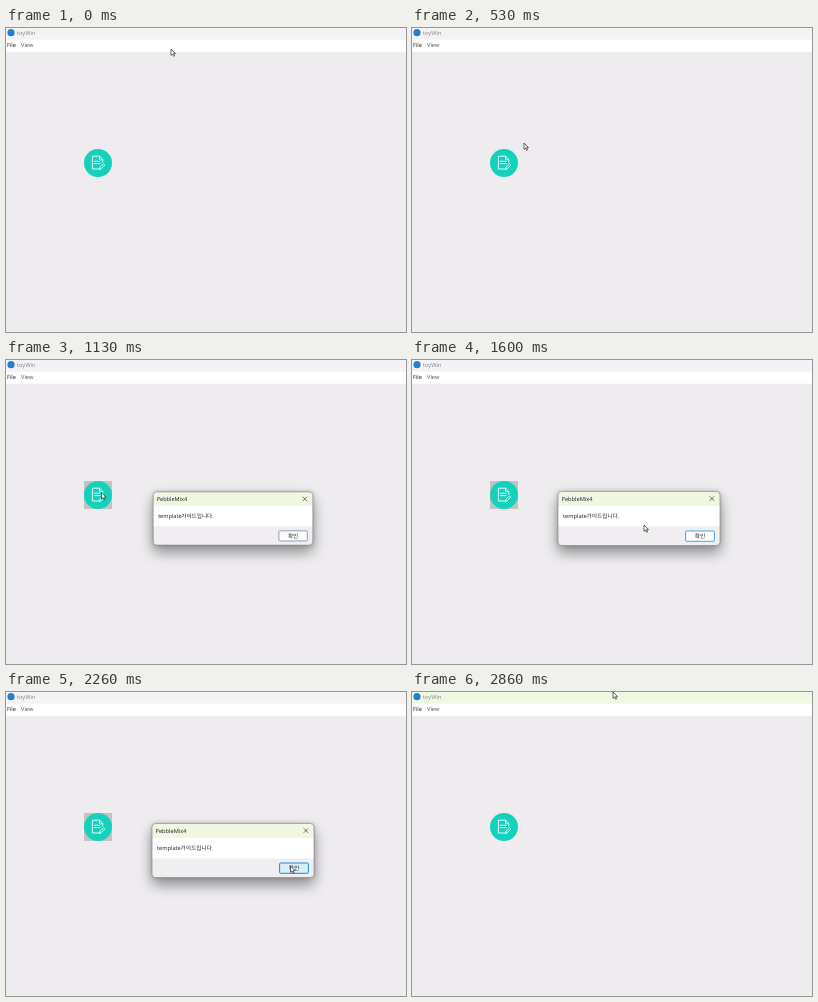
Animation, 400 px wide and 304 px high, one loop 2930 ms. Source, as an HTML page:

```html
<!DOCTYPE html>
<html lang="ko">
<head>
<meta charset="utf-8">
<style>
html, body { margin: 0; width: 100%; height: 100%; overflow: hidden; background: #eeecef; }
svg { display: block; width: 400px; height: 304px; }
text { font: 5.7px "Open Sans", "Noto Sans CJK KR", "Noto Sans CJK", sans-serif; fill: #222; text-rendering: geometricPrecision; }
#dialog { transform-origin: 227px 158.5px; }
.shadow { filter: drop-shadow(0 7px 7px rgba(0, 0, 0, .36)) drop-shadow(0 0 2px rgba(0, 0, 0, .25)); }
.ko { font-family: "Noto Sans CJK KR", "Noto Sans CJK", sans-serif; }
.line { fill: none; stroke: #fff; stroke-width: .9; stroke-linejoin: round; stroke-linecap: round; }
</style>
</head>
<body>
<svg viewBox="0 0 400 304">
  <rect width="400" height="304" fill="#eeecef"/>
  <rect id="bar" width="400" height="11.5"/>
  <circle cx="5" cy="4.7" r="3.6" fill="#2380cc"/>
  <text id="title" x="11" y="7">toyWin</text>
  <rect y="11.5" width="400" height="12.3" fill="#fff"/>
  <text x="1" y="19">File</text>
  <text x="15" y="19" fill-opacity=".75">View</text>

  <rect id="focus" x="78" y="121" width="28" height="28" fill="#c3c3c3"/>
  <circle cx="92" cy="135" r="14" fill="#14d1bc"/>
  <g class="line">
    <path d="M96.8 134V131.6L93.6 128.2H86.4V141H92.5M93.6 128.2V131.6H96.8M88.5 133.3H94M88.5 135.6H94"/>
    <path id="pencil" d="M93.4 141.2L94 139.2L97.4 135.8L98.8 137.2L95.4 140.6Z"/>
  </g>

  <g id="dialog">
    <rect class="shadow" x="146" y="131.5" width="162" height="54" rx="3.5" fill="#f0eef1"/>
    <path d="M146 146V135Q146 131.5 149.5 131.5H304.5Q308 131.5 308 135V146Z" fill="#f0f7e2"/>
    <rect x="146" y="146" width="162" height="20.5" fill="#fff"/>
    <rect x="146" y="131.5" width="162" height="54" rx="3.5" fill="none" stroke="#8d8d8d" stroke-width=".7"/>
    <text x="149.5" y="140.7" textLength="">PebbleMix4</text>
    <path d="M297.7 136.4L302.1 140.8M302.1 136.4L297.7 140.8" stroke="#333" stroke-width=".7"/>
    <text x="151" y="158">template</text>
    <text class="ko" x="174.5" y="158">가이드입니다.</text>
    <rect id="button" x="273.6" y="171" width="28.8" height="10.3" rx="1"/>
    <text class="ko" x="288" y="178.2" text-anchor="middle">확인</text>
  </g>

  <path id="cursor" d="M0 0V6.3L1.5 5L2.6 7.3L3.6 6.8L2.6 4.6H4.5Z" fill="#fff" stroke="#333" stroke-width=".75" stroke-linejoin="round"/>
</svg>
<script>
const LOOP = 2930, STEPS = 44;
const $ = id => document.getElementById(id);
const set = (id, attrs) => {
  for (const k in attrs) $(id).setAttribute(k, attrs[k]);
};

// Cursor tip: step, x, y
const path = [
  [0, 165, 21], [8, 112, 115], [12, 95.5, 132.5], [17, 95.5, 132.5],
  [24, 232, 165], [30, 284.5, 174], [35, 284.5, 174], [41, 203, 4], [43, 201, 0]
];

function cursorAt(n) {
  const i = Math.max(1, path.findIndex(p => p[0] >= n));
  const [a, b] = [path[i - 1], path[i]];
  const u = (n - a[0]) / (b[0] - a[0]);
  const e = u * u * (3 - 2 * u);
  return [1, 2].map(k => a[k] + (b[k] - a[k]) * e);
}

function draw(n) {
  const open = n >= 16 && n < 36;
  const closed = n >= 36;
  const hover = n >= 29;
  const opening = n === 16 ? [.95, .65] : n === 17 ? [.985, 1] : [1, 1];
  const [scale, alpha] = n === 35 ? [.97, .6] : opening;

  set('bar', { fill: closed ? '#f0f8e3' : '#f4f2f5' });
  $('title').style.fill = n >= 14 && n < 16 ? '#222' : '#858585';
  set('focus', { visibility: open ? 'visible' : 'hidden' });
  set('dialog', { visibility: open ? 'visible' : 'hidden', opacity: alpha });
  $('dialog').style.transform = `scale(${scale})`;
  set('button', {
    fill: hover ? '#d9edfa' : '#fdfdfd',
    stroke: n < 18 ? '#6f87a8' : hover ? '#2389d0' : '#4aa5e4',
    'stroke-width': n < 18 ? .8 : 1
  });
  set('cursor', { transform: `translate(${cursorAt(n)})` });
}

function tick(now) {
  const t = now % LOOP;
  draw(Math.floor((t + 8) * STEPS / LOOP) % STEPS);
  requestAnimationFrame(tick);
}
draw(0);
requestAnimationFrame(tick);
</script>
</body>
</html>
```
